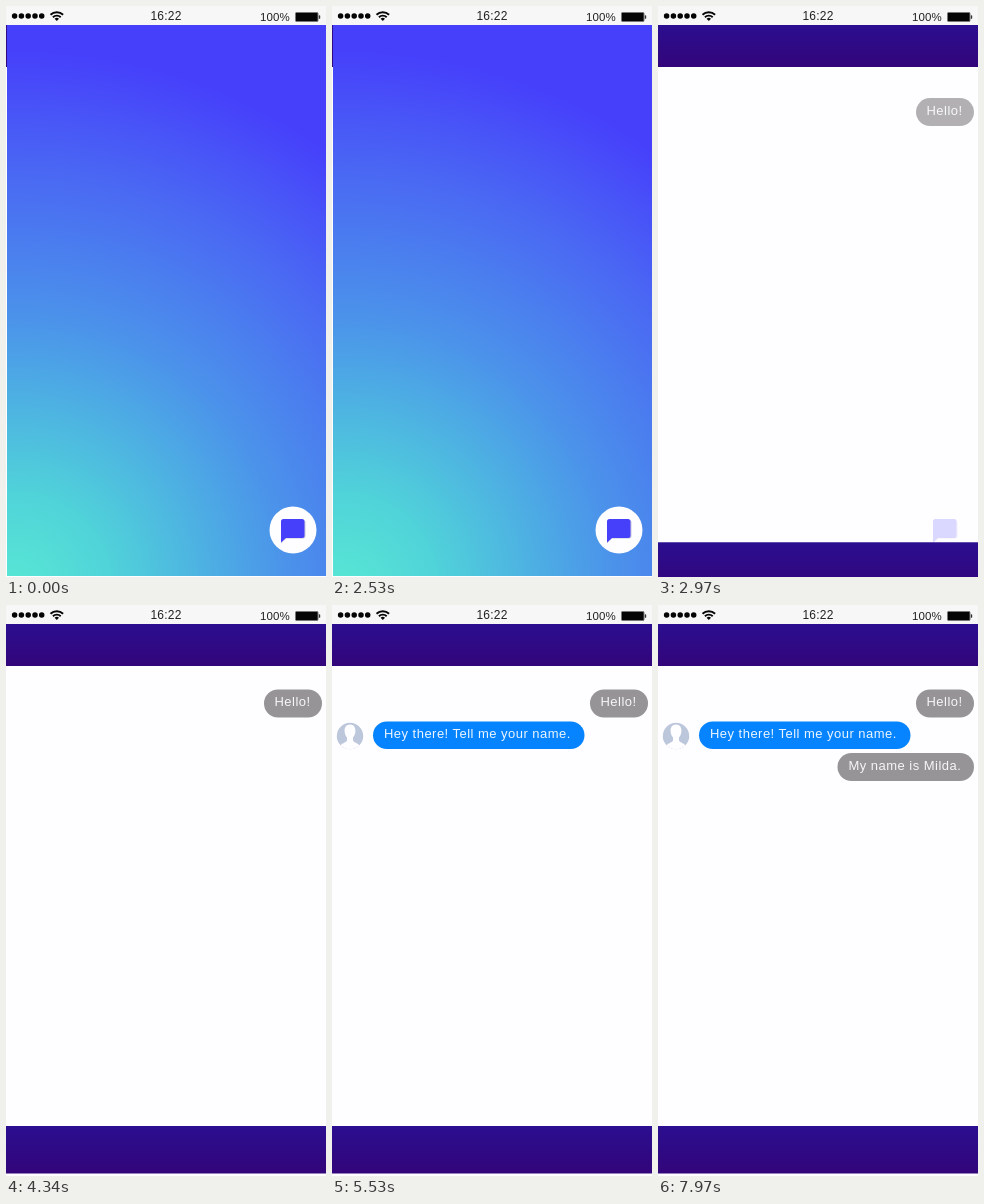
Animation, 320 px wide and 571 px high, one loop 8 s. Source, as an HTML page:

```html
<!DOCTYPE html>
<html lang="en">
<head>
<meta charset="utf-8">
<title>Chat opening</title>
<style>
  html, body { margin: 0; width: 100%; height: 100%; overflow: hidden; background: #fefdff; }
  svg { display: block; width: 100vw; height: 100vh; }
  text { font-family: "Liberation Sans", Arial, sans-serif; }
  .msg text { font-size: 13px; letter-spacing: .47px; fill: #fff; fill-opacity: .92; }
  .status text { font-size: 12px; fill: #222; }
</style>
</head>
<body>
<svg viewBox="0 0 320 571" preserveAspectRatio="none">
  <defs>
    <radialGradient id="glow" gradientUnits="userSpaceOnUse" cx="8" cy="585" r="540">
      <stop offset="0" stop-color="#58e8d4"/>
      <stop offset=".18" stop-color="#50d3d9"/>
      <stop offset=".5" stop-color="#4b94ea"/>
      <stop offset=".77" stop-color="#4a69f3"/>
      <stop offset="1" stop-color="#4640fb"/>
    </radialGradient>
    <linearGradient id="bar" x2="0" y2="1">
      <stop offset="0" stop-color="#2b0e90"/>
      <stop offset="1" stop-color="#33057a"/>
    </linearGradient>
    <clipPath id="face"><circle cx="18" cy="131" r="13.2"/></clipPath>
  </defs>

  <rect width="320" height="571" fill="#fefdff"/>
  <rect y="19" width="320" height="42" fill="url(#bar)"/>
  <rect id="cover" x="1" y="19" width="319" height="551" fill="url(#glow)"/>

  <g id="fab">
    <circle cx="287" cy="524" r="23.5" fill="#fefdff"/>
    <path d="M277.5 514H297a2.5 2.5 0 0 1 2.5 2.5V530a2.5 2.5 0 0 1-2.5 2.5H280L275 537.5V516.5a2.5 2.5 0 0 1 2.5-2.5Z" fill="#c9c8dc"/>
    <path d="M277.5 513H296a2.5 2.5 0 0 1 2.5 2.5V529.5a2.5 2.5 0 0 1-2.5 2.5H280L275 536.5V515.5a2.5 2.5 0 0 1 2.5-2.5Z" fill="#4640fb"/>
  </g>

  <rect id="footer" y="521" width="320" height="47.5" fill="url(#bar)"/>

  <g class="msg" id="hello">
    <rect x="258" y="84.5" width="58" height="28" rx="14" fill="#969496"/>
    <text x="268.5" y="101">Hello!</text>
  </g>
  <g class="msg" id="reply">
    <g clip-path="url(#face)">
      <rect x="4" y="117" width="28" height="28" fill="#bdc7dc"/>
      <path d="M18 119.5c4 0 5.6 3 5.4 6.500c-.1 3-1 5-2.400 6.500v3c1 2.500 6 2.500 7.500 6.500v3H7.500v-3c1.500-4 6.500-4 7.500-6.500v-3c-1.400-1.500-2.300-3.500-2.400-6.500c-.2-3.500 1.400-6.500 5.400-6.500Z" fill="#fefdff"/>
    </g>
    <rect x="41" y="116.5" width="211.5" height="27.5" rx="13.75" fill="#0684ff"/>
    <text x="52" y="133">Hey there! Tell me your name.</text>
  </g>
  <g class="msg" id="answer">
    <rect x="179.500" y="148" width="136.500" height="28" rx="14" fill="#969496"/>
    <text x="190.500" y="165">My name is Milda.</text>
  </g>

  <g class="status">
    <rect width="320" height="19" fill="#f7f7f7"/>
    <path d="M8.600 10h.01M15.400 10h.01M22.200 10h.01M29 10h.01M35.700 10h.01" stroke="#050505" stroke-width="5.500" stroke-linecap="round"/>
    <g fill="none" stroke="#050505" stroke-width="1.900">
      <path d="M44.500 8.800a9 9 0 0 1 12.600 0M46.900 11.200a5.600 5.600 0 0 1 7.800 0"/>
    </g>
    <path d="M50.800 15l-2.200-2.300a3.200 3.200 0 0 1 4.400 0Z" fill="#050505"/>
    <text x="144.500" y="14" letter-spacing=".2">16:22</text>
    <text x="254" y="15" letter-spacing=".1" style="font-size:11.500px">100%</text>
    <rect x="289.500" y="6.500" width="22.500" height="9" rx="1" fill="#050505" stroke="#777"/>
    <rect x="312.800" y="9.300" width="1.400" height="3.500" rx=".6" fill="#333"/>
  </g>
</svg>
<script>
  const LOOP = 8000;
  const $ = id => document.getElementById(id);
  const cover = $('cover'), glow = $('glow'), fab = $('fab'), footer = $('footer');
  const messages = [
    { el: $('hello'), start: 2840, time: 370 },
    { el: $('reply'), start: 5120, time: 400 },
    { el: $('answer'), start: 7540, time: 400 }
  ];

  const span = (t, start, time) => Math.min(1, Math.max(0, (t - start) / time));
  const easeInOut = p => p * p * (3 - 2 * p);
  const easeOut = p => 1 - (1 - p) ** 3;

  function draw(t) {
    // The cover folds up under the status bar
    const fold = easeInOut(span(t, 2600, 370));
    const r = 540 - 150 * fold;
    cover.setAttribute('height', 551 * (1 - fold));
    glow.setAttribute('r', r);
    glow.setAttribute('cy', 45 + r);

    fab.setAttribute('opacity', 1 - span(t, 2850, 150));
    footer.setAttribute('y', 571 - 50 * easeOut(span(t, 2860, 340)));

    for (const { el, start, time } of messages) {
      const p = easeOut(span(t, start, time));
      el.setAttribute('opacity', p);
      el.setAttribute('transform', `translate(0 ${28 * (1 - p)})`);
    }
  }

  function tick() {
    draw(performance.now() % LOOP);
    requestAnimationFrame(tick);
  }
  tick();
</script>
</body>
</html>
```
